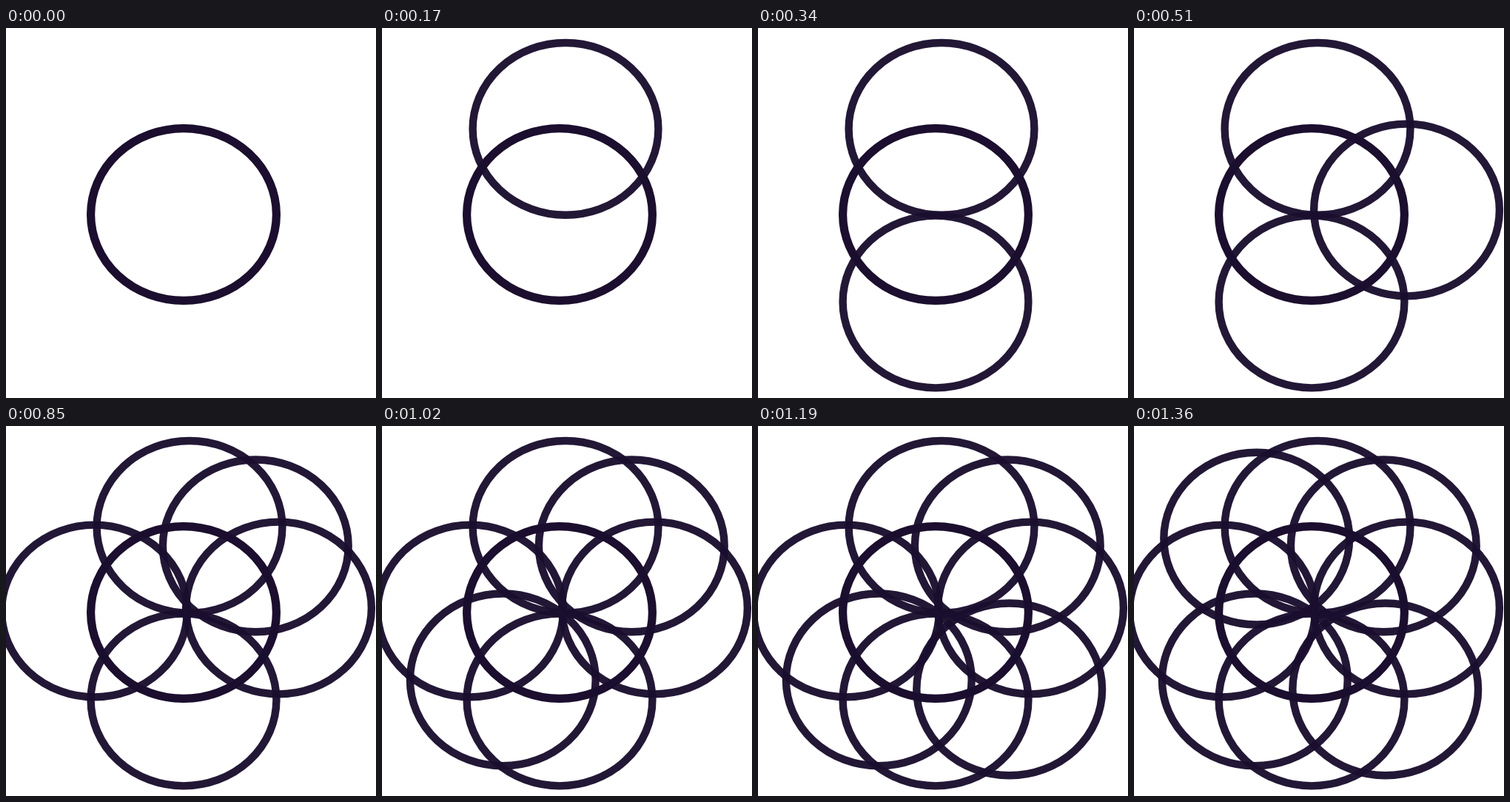
An HTML page that plays this animation: 500x500 px, repeating every 1530 ms.

```html
<!DOCTYPE html>
<html lang="en">
<head>
<meta charset="utf-8">
<title>Rings</title>
<style>
  html, body { margin: 0; width: 100%; height: 100%; overflow: hidden; background: #fff; }
  svg { display: block; width: 100%; height: 100%; }
  ellipse { fill: none; stroke: #1b0e2e; stroke-width: 10.4; stroke-opacity: .96; }
  ellipse:first-child { stroke-width: 11.2; stroke-opacity: 1; }
</style>
</head>
<body>
<svg viewBox="0 0 500 500"></svg>
<script>
  const STEP = 170;
  const svg = document.querySelector('svg');
  const rings = [];

  function addRing(cx, cy) {
    const ring = document.createElementNS(svg.namespaceURI, 'ellipse');
    const attributes = { cx, cy, rx: 125.4, ry: 116.4 };
    for (const name in attributes) ring.setAttribute(name, attributes[name]);
    svg.append(ring);
    rings.push(ring);
  }

  // A petal in direction (u, v), on a slightly skewed, hand-drawn-looking grid.
  function addPetal(u, v) {
    const diagonal = Math.abs(u * v);
    addRing(
      244 + 7.5 * diagonal + (124.5 - 37.5 * diagonal) * u - 4 * (1 - diagonal) * v + 1.2 * u * v,
      248 + 5.2 * v * v + (116.8 - 20.6 * diagonal) * v + (7.7 * diagonal - 2) * u + 0.8 * u * v
    );
  }

  addRing(240, 252);
  for (const [u, v] of [[0, -1], [1, 0], [1, -1], [1, 1]]) {
    addPetal(u, v);
    addPetal(-u, -v);
  }

  // One more ring appears at each step; the loop restarts with the first alone.
  function draw() {
    const step = Math.floor(performance.now() / STEP) % rings.length;
    rings.forEach((ring, i) => { ring.style.display = i <= step ? '' : 'none'; });
    requestAnimationFrame(draw);
  }
  draw();
</script>
</body>
</html>
```
